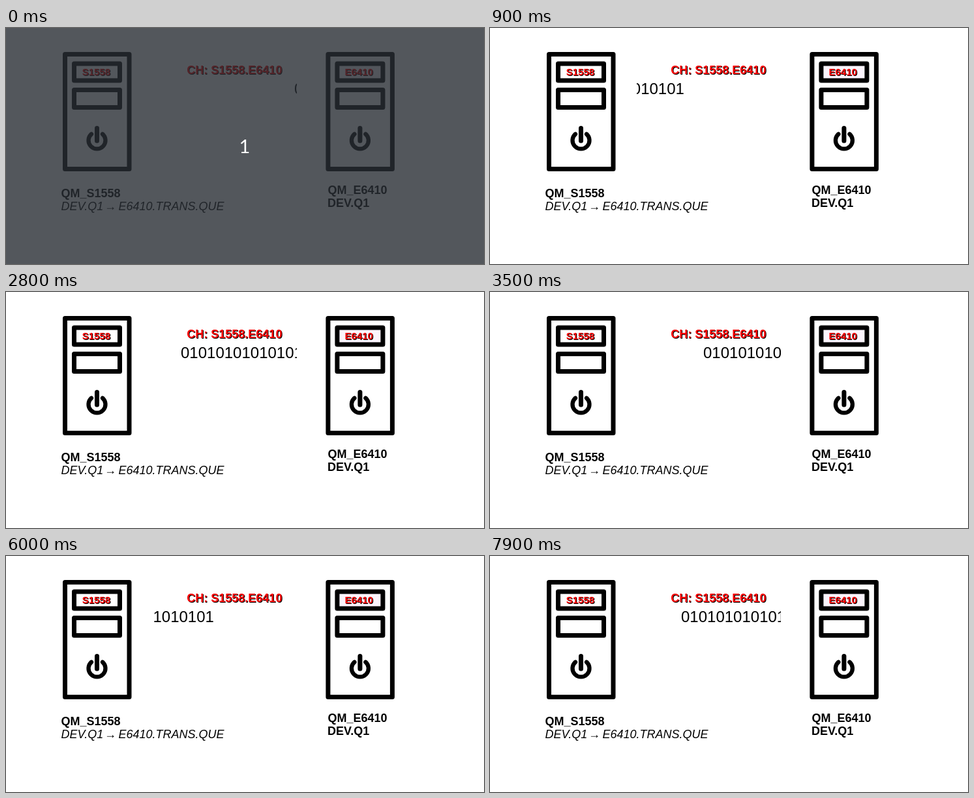
An HTML page for the animation above (8 s loop, 733 by 364 pixels).

```html
<!DOCTYPE html>
<html lang="en">
<head>
<meta charset="utf-8">
<title>Message channel</title>
<style>
  html, body { margin: 0; width: 100%; height: 100%; overflow: hidden; background: #fff; }
  svg { display: block; font: 18px "Liberation Sans", Arial, sans-serif; }
  .bold { font-weight: bold; }
  .line { fill: none; stroke: #000; stroke-width: 7; stroke-linejoin: round; stroke-linecap: round; }
</style>
</head>
<body>
<svg width="733" height="364" viewBox="0 0 733 364">
  <defs>
    <clipPath id="window"><rect x="225" y="80" width="221" height="30"/></clipPath>
    <g id="server" class="line">
      <rect x="90.5" y="40.5" width="98.5" height="177"/>
      <rect x="104.5" y="55" width="70" height="26"/>
      <rect x="104.5" y="95.5" width="70" height="27"/>
      <path d="M139.5 154.5V174"/>
      <path d="M131 163.5A13 13 0 1 0 148 163.5" stroke-width="6.3"/>
    </g>
    <g id="labels" class="bold">
      <text x="277.3" y="71">CH: S1558.E6410</text>
      <g font-size="15">
        <text x="116.7" y="73">S1558</text>
        <text x="519.5" y="73">E6410</text>
      </g>
    </g>
  </defs>

  <rect x="508" y="58" width="70" height="20" fill="#fbf4fd"/>
  <use href="#server"/>
  <use href="#server" x="403.4"/>
  <use href="#labels" x="1" y="1"/>
  <use href="#labels" fill="#f00"/>

  <g class="bold">
    <text x="84.4" y="261">QM_S1558</text>
    <text x="493.4" y="256">QM_E6410</text>
    <text x="493" y="276">DEV.Q1</text>
  </g>
  <text x="84.5" y="281" font-style="italic">DEV.Q1<tspan x="151">→</tspan><tspan x="172.5">E6410.TRANS.QUE</tspan></text>

  <g clip-path="url(#window)"><text id="bits" y="102" font-size="24">01010101010101</text></g>

  <g id="countdown">
    <rect width="733" height="364" fill="#292d34" fill-opacity=".8"/>
    <text x="366" y="193" fill="#fff" text-anchor="middle" style="font: 29px Lato, 'DejaVu Sans', sans-serif">1</text>
  </g>
</svg>
<script>
  const LOOP = 8000, TICK = 100, SPEED = 8.47;
  const bits = document.getElementById("bits");
  const countdown = document.getElementById("countdown");

  // Left edge of the bit string at a tick; it wraps after ticks 0 and 49.
  function bitsX(n) {
    if (n < 1) return 442;
    if (n <= 18) return 111 + SPEED * (n - 9);
    if (n <= 27) return 187.2 + 8 * (n - 18);
    if (n < 50) return 259.2 + SPEED * (n - 27);
    return 132 + SPEED * (n - 60);
  }

  function draw() {
    const n = Math.floor(performance.now() % LOOP / TICK);
    bits.setAttribute("x", Math.round(bitsX(n)));
    countdown.style.display = n < 1 ? "" : "none";
    requestAnimationFrame(draw);
  }
  draw();
</script>
</body>
</html>
```
